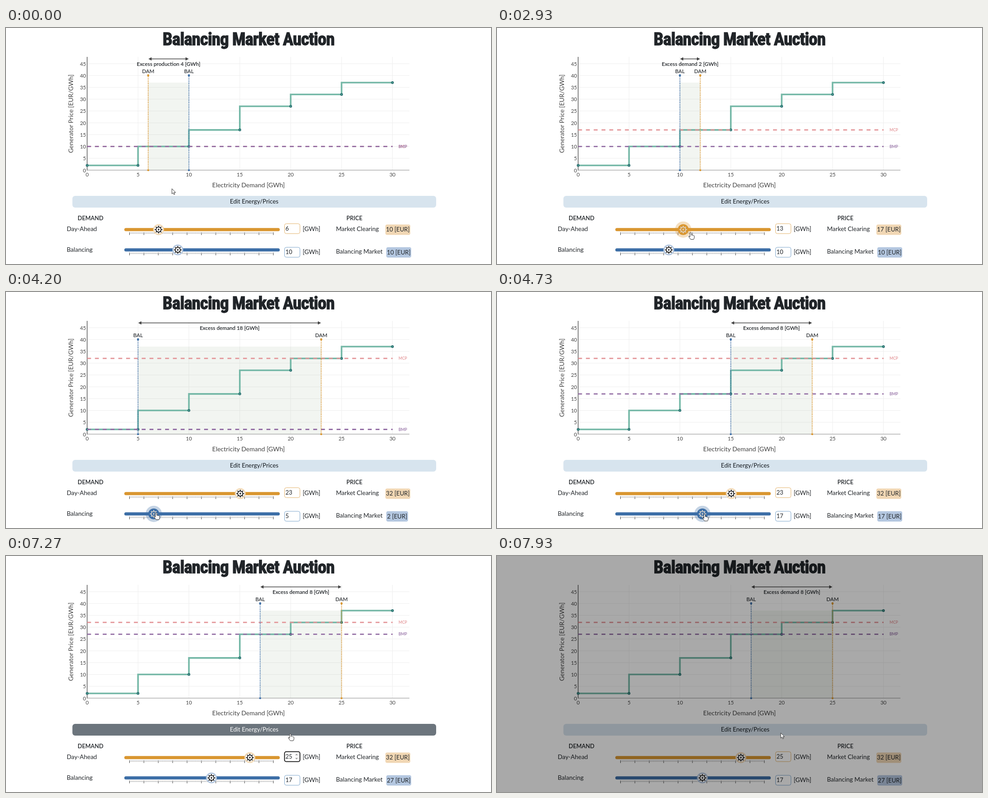
Animation of 1070x523 px, one loop 8 s. Source, as an HTML page:

```html
<!DOCTYPE html>
<html lang="en">
<head>
<meta charset="utf-8">
<title>Balancing Market Auction</title>
<style>
  html, body { margin: 0; width: 100%; height: 100%; overflow: hidden; background: #fff; }
  svg { display: block; width: 1070px; height: 523px; font-family: Lato, "Open Sans", sans-serif; }
  .title { font: 900 39px "Roboto Condensed", Roboto, "Open Sans", sans-serif; font-stretch: 75%; letter-spacing: -1px; stroke: #212529; stroke-width: 1.3px; }
</style>
</head>
<body>
<svg viewBox="0 0 1070 523"><g id="page"></g><g id="live"></g></svg>
<script>
const LOOP = 8000;
const ORANGE = '#d99630', BLUE = '#3c6ea6', TEAL = '#75b8a7', PINK = '#e39497', PURPLE = '#946fa5';
const INK = '#212529', AXIS = '#444';
const PRICES = [2, 10, 17, 27, 32, 37];
const GRAB = 278, UNIT = 10.6;   // slider pixels: pointer position at zero, pixels per GWh

const chartX = v => 179 + 22.453 * v;
const chartY = p => 315 - 5.243 * p;
const priceAt = demand => PRICES[Math.max(0, Math.ceil(demand / 5) - 1)];
const clamp = (v, a = 0, b = 1) => Math.min(b, Math.max(a, v));
const ramp = (t, start, length) => clamp((t - start) / length);
const range = n => [...Array(n).keys()];

const text = (s, x, y, size, opt = '') => `<text x="${x}" y="${y}" font-size="${size}" fill="${INK}" ${opt}>${s}</text>`;
const line = (x1, y1, x2, y2, color, width = 1, opt = '') =>
  `<path d="M${x1} ${y1}L${x2} ${y2}" stroke="${color}" stroke-width="${width}" ${opt}/>`;
const rect = (x, y, w, h, fill, r = 0, opt = '') =>
  `<rect x="${x}" y="${y}" width="${w}" height="${h}" rx="${r}" fill="${fill}" ${opt}/>`;
const dot = (x, y, r, fill, opt = '') => `<circle cx="${x}" cy="${y}" r="${r}" fill="${fill}" ${opt}/>`;
const path = (d, opt) => `<path d="${d}" ${opt}/>`;
const MID = 'text-anchor="middle"', END = 'text-anchor="end"';

// Pointer track: time, x, y
const TRACK = [
  [0, 366, 356], [70, 366, 356], [270, 367, 355], [470, 368, 353], [530, 369, 350], [940, 369, 349],
  [1200, 367, 347], [1600, 367, 347], [1800, 365, 364], [2070, 358, 396], [2400, 346, 431],
  [2500, 342, 448], [2600, 342, 450], [2930, 427, 453], [3250, 522, 455], [3400, 522, 455],
  [3770, 384, 491], [3800, 384, 491], [4080, 332, 489], [4200, 331, 489], [4270, 331, 489],
  [4700, 458, 492], [4780, 458, 492], [5000, 636, 447], [5270, 633, 443], [5530, 632, 442],
  [5800, 630, 441], [6800, 630, 441], [7200, 628, 395], [7400, 626, 392], [8000, 626, 392]
];

function pointer(t) {
  const i = Math.max(1, TRACK.findIndex(k => k[0] >= t));
  const [t0, x0, y0] = TRACK[i - 1], [t1, x1, y1] = TRACK[i];
  const u = ramp(t, t0, t1 - t0);
  return [x0 + (x1 - x0) * u, y0 + (y1 - y0) * u];
}

const dragged = t => Math.round((pointer(t)[0] - GRAB) / UNIT);

function dayAhead(t) {
  if (t < 2560) return 6;
  return t < 6500 ? dragged(Math.min(t, 3400)) : 25;
}

function balancing(t) {
  return t < 3800 ? 10 : dragged(Math.min(t, 4780));
}

function pageMarkup() {
  let s = text('Balancing Market Auction', 535, 38, 39, `class="title" ${MID}`);
  for (const i of range(10)) {
    const y = chartY(i * 5);
    if (i) s += line(179, y, 890, y, '#eee');
    s += text(i * 5, 176.5, y + 4.5, 11.5, `${END} style="fill:${AXIS}"`);
  }
  for (const i of range(7)) {
    const x = chartX(i * 5);
    if (i) s += line(x, 64, x, 315, '#eee');
    s += text(i * 5, x, 329, 11.5, `${MID} style="fill:${AXIS}"`);
  }
  s += text('Electricity Demand [GWh]', 535, 353, 14, `${MID} style="fill:${AXIS}"`);
  s += text('Generator Price [EUR/GWh]', 0, 0, 14, `${MID} transform="translate(147.5 190)rotate(-90)" style="fill:${AXIS}"`);
  s += text('DEMAND', 158, 426, 12.7, 'font-weight="600"') + text('PRICE', 751, 426, 12.7, 'font-weight="600"');
  s += text('Day-Ahead', 134, 449.5, 13.5) + text('Balancing', 134, 495.5, 13.5);
  s += text('[GWh]', 654.5, 449.5, 13.5) + text('[GWh]', 654.5, 501, 13.5);
  s += text('Market Clearing', 728, 449.5, 13.5) + text('Balancing Market', 728, 499.5, 13.5);
  for (const [y, color] of [[446.7, ORANGE], [491.7, BLUE]]) {
    s += rect(261, y - 3.5, 343, 7, color, 3.5);
    for (const i of range(101)) {
      const x = 272.5 + i * 3.173, major = i % 10 === 0;
      s += line(x, y + 6, x, y + (major ? 12 : 9.3), major ? '#333' : '#777', major ? 1 : .8);
    }
  }
  return s;
}

const STEP = 'M' + PRICES.map((p, i) => `${chartX(i * 5)} ${chartY(p)}H${chartX(i * 5 + 5)}`).join('L');

function marketLine(demand, name, color) {
  const x = chartX(demand);
  return line(x, 315, x, 105, color, 2, 'stroke-dasharray="1.91"') +
    dot(x, 105, 2.4, color) + dot(x, 315, 2.2, color) +
    text(name, x, 99.5, 11.5, `${MID} font-weight="500"`);
}

function priceLine(price, name, color) {
  const y = chartY(price);
  return line(179, y, 853, y, color, 2.8, 'stroke-dasharray="8.6"') +
    text(name, 866, y + 3, 8.5, `style="fill:${color}" font-weight="600"`);
}

function chart(dam, bal) {
  const x1 = chartX(Math.min(dam, bal)), x2 = chartX(Math.max(dam, bal));
  const label = `Excess ${dam < bal ? 'production' : 'demand'} ${Math.abs(dam - bal)} [GWh]`;
  let s = rect(x1, 121, x2 - x1, 194, 'rgba(115,140,105,.09)');
  s += line(179, 64, 179, 315.5, AXIS, 1.3) + line(179, 315, 890, 315, '#888', 1.2);
  s += path(STEP, `fill="none" stroke="${TEAL}" stroke-width="3.6"`);
  s += [0, ...PRICES].map((p, i) => dot(chartX(i * 5), chartY(p || 2), 2.3, '#55a596', 'stroke="#22666a" stroke-width="1.4"')).join('');
  s += priceLine(priceAt(dam), 'MCP', PINK) + priceLine(priceAt(bal), 'BMP', PURPLE);
  s += marketLine(dam, 'DAM', ORANGE) + marketLine(bal, 'BAL', BLUE);
  if (dam !== bal) {
    s += line(x1 + 5, 68.5, x2 - 5, 68.5, AXIS, 1.6);
    s += path(`M${x1 + .5} 68.5l7 -3.7v7.4zM${x2 - .5} 68.5l-7 -3.7v7.4z`, `fill="${AXIS}"`);
  }
  return s + text(label, (x1 + x2) / 2, 83.5, 11.7, `${MID} font-weight="600"`);
}

function knob(value, y, color, pale, active) {
  const icon = active ? '#dcd6cc' : '#111';
  const rays = range(8).map(i => `<path d="M0 -6V-8.6" transform="rotate(${i * 45})"/>`).join('');
  return `<g transform="translate(${273 + UNIT * value} ${y})">` +
    (active ? dot(0, 0, 18, color, 'opacity=".3"') + dot(0, 0, 12, color)
            : dot(0, 0, 12, pale) + dot(0, 0, 9.3, '#fff')) +
    `<g fill="none" stroke="${icon}" stroke-width="1.7">${dot(0, 0, 5.6, 'none')}${rays}</g>` +
    path('M1.2 -3.8L-2.5 .6H-.3L-1.2 3.8L2.5 -.7H.4z', `fill="${icon}"`) + '</g>';
}

function priceTag(price, x, y, fill) {
  const width = price < 10 ? 48 : 55;
  return rect(x, y, width, 23, fill, 4) + text(`${price} [EUR]`, x + width / 2, y + 15.8, 13.2, MID);
}

function numberBox(value, y, border, focused) {
  return rect(614.5, y, 34, 22, '#fff', 4, `stroke="${focused ? '#111' : border}" stroke-width="${focused ? 1.8 : 1}"`) +
    text(value, 616.5, y + 15.2, 13);
}

function dayAheadBox(value, t) {
  const focused = t >= 5530 && t < 7670;
  let s = numberBox(value, 433.7, '#e3b26b', focused);
  if (t >= 5000 && t < 7670) s += path('M638 441.5l3 -3.5l3 3.5zM638 447.5l3 3.5l3 -3.5z', 'fill="#999"');
  if (t >= 5730 && t < 6470) s += rect(623, 436, 7, 18, '#3367c0') + text('3', 623.2, 449, 13, 'style="fill:#fff"');
  return s;
}

function button(t) {
  const hover = t < 4000 ? ramp(t, 1850, 120) - ramp(t, 2090, 150) : ramp(t, 7130, 130) - ramp(t, 7650, 130);
  const mix = (a, b) => Math.round(a + (b - a) * hover);
  const ink = `rgb(${mix(20, 255)},${mix(25, 255)},${mix(30, 255)})`;
  return rect(146.5, 372, 802.5, 26, `rgb(${mix(215, 108)},${mix(228, 117)},${mix(238, 125)})`, 6) +
    text('Edit Energy/Prices', 547.5, 389, 13.3, `${MID} style="fill:${ink}"`);
}

function toolbar(t) {
  const opacity = ramp(t, 20, 250) - ramp(t, 1860, 300);
  if (opacity <= 0) return '';
  const gray = '#c7c7c7';
  const sign = d => path(`M859 52h10v10h-10zM876 52h10v10h-10z`, `fill="${gray}"`) + path(d, 'stroke="#fff" stroke-width="1.8"');
  return `<g opacity="${opacity}" fill="none">` +
    path('M764 54h3l1 -1.5h4l1 1.5h2v7.5h-11z', `fill="${gray}"`) + dot(769.5, 57.5, 2.2, gray, 'stroke="#fff"') +
    dot(790.5, 56, 3.4, 'none', 'stroke="#7c7c7c" stroke-width="1.8"') + line(793, 58.5, 797, 62, '#7c7c7c', 2) +
    line(788.8, 56, 792.2, 56, '#7c7c7c') + line(790.5, 54.3, 790.5, 57.7, '#7c7c7c') +
    path('M803.5 57h10M808.5 52v10M805 55.5l-1.5 1.5l1.5 1.5M812 55.5l1.5 1.5l-1.5 1.5M807 53.5l1.5 -1.5l1.5 1.5M807 60.5l1.5 1.5l1.5 -1.5', `stroke="${gray}" stroke-width="1.3"`) +
    rect(820, 52, 10.5, 10, 'none', 0, `stroke="${gray}" stroke-width="1.4" stroke-dasharray="2 1"`) +
    path('M839 59c-4 -3 -1 -7 4 -7s6 4 2 6s-6 -1 -6 1s2 1 1 3', `stroke="${gray}" stroke-width="1.4"`) +
    sign('M861 57h6M864 54v6M878 57h6') +
    path('M893 55v-3h3M900 52h3v3M903 59v3h-3M896 62h-3v-3M895 54l6 6M901 54l-6 6', `stroke="${gray}" stroke-width="1.4"`) +
    path('M909 57.5l5.5 -5l5.5 5h-1.5v4.5h-2.8v-3h-2.4v3h-2.8v-4.5z', `fill="${gray}"`) +
    rect(931, 51, 11.5, 11.5, '#111') + '</g>';
}

function cursor(t) {
  const [x, y] = pointer(t);
  const onButton = y > 372 && y < 398 && t < 7830;
  const onSlider = (t > 2430 && t < 3450) || (t > 3700 && t < 4800);
  const onInput = t >= 4980 && t < 6900;
  const outline = 'fill="#fff" stroke="#333" stroke-width="1" stroke-linejoin="round"';
  const shape = onInput ? path('M-2 -6.5H2M0 -6.5V6.5M-2 6.5H2', 'fill="none" stroke="#333" stroke-width="1"')
    : onButton || onSlider
      ? path('M-1.5 1Q0 -1 1.5 1V6Q3 5 4 6.5Q5.5 5.5 6.3 7Q8 6.5 8 8.5V11Q8 13 6.5 15.5H0L-4 10Q-5 8 -3.3 8L-1.5 10z', outline)
      : path('M0 0V11.5L2.7 9.2L4.5 13.2L6.4 12.3L4.7 8.6H8.2z', outline);
  return `<g transform="translate(${x} ${y})">${shape}</g>`;
}

function scene(t) {
  // The chart redraws a little after the sliders, the sliders a little after the pointer.
  const dam = dayAhead(t - 40), bal = balancing(t - 40);
  const chartDam = dayAhead(t - 100), chartBal = balancing(t - 100);
  const typedDam = t >= 6470 ? 25 : dam;
  return chart(chartDam, chartBal) + toolbar(t) + button(t) +
    knob(dam, 446.7, ORANGE, '#f2d8b3', t > 2500 && t < 3420) +
    knob(bal, 491.7, BLUE, '#b3c7e0', t > 3770 && t < 4800) +
    dayAheadBox(typedDam, t) + numberBox(bal, 486, '#7ba4cb', false) +
    priceTag(priceAt(chartDam), 837, 435.5, '#f1d7b4') + priceTag(priceAt(chartBal), 839, 485.7, '#b4c7e0') +
    rect(0, 0, 1070, 523, '#000', 0, `opacity="${.5 * ramp(t, 7830, 150)}"`) + cursor(t);
}

const live = document.getElementById('live');
document.getElementById('page').innerHTML = pageMarkup();

function frame() {
  live.innerHTML = scene(performance.now() % LOOP);
  requestAnimationFrame(frame);
}
frame();
</script>
</body>
</html>
```
